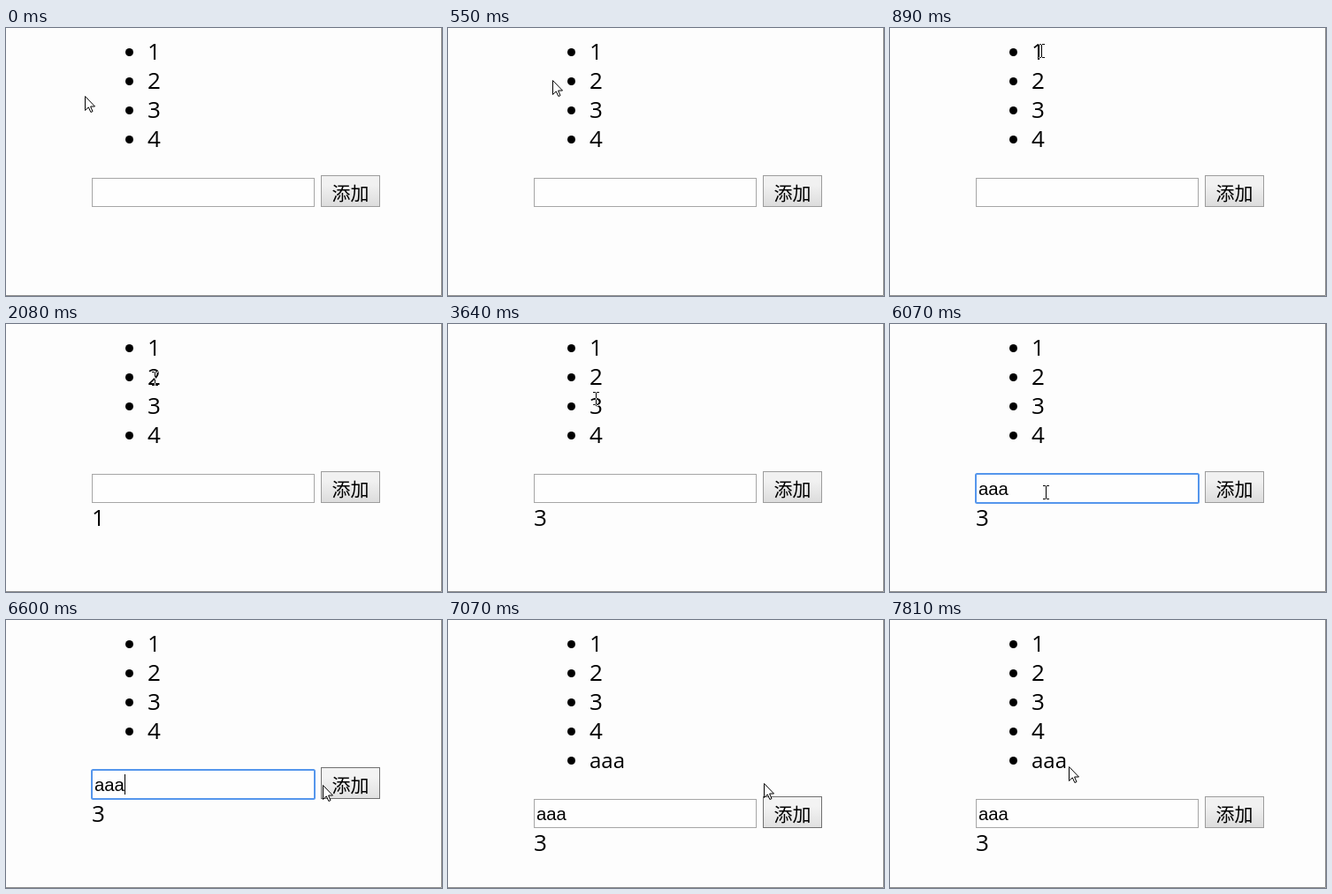
An HTML page that plays this animation: 493 by 304 pixels, repeating every 8000 ms.

```html
<!DOCTYPE html>
<html lang="zh">
<head>
<meta charset="utf-8">
<style>
html, body { margin: 0; width: 100%; height: 100%; overflow: hidden; background: #fdfdfd; }
svg { display: block; }
.list { font: 26px "Open Sans", sans-serif; }
.item { font-size: 24px; }
.field { font: 20.3px "Liberation Sans", sans-serif; }
.label { font: 21px "Noto Sans CJK SC", "Noto Sans CJK", sans-serif; text-anchor: middle; }
#beam { fill: #fff; mix-blend-mode: difference; }
</style>
</head>
<body>
<svg width="493" height="304" viewBox="0 0 493 304">
  <defs>
    <linearGradient id="normal" x2="0" y2="1">
      <stop offset=".3" stop-color="#f1f1f1"/><stop offset="1" stop-color="#dcdcdc"/>
    </linearGradient>
    <linearGradient id="hover" x2="0" y2="1">
      <stop offset=".3" stop-color="#f3f3f3"/><stop offset="1" stop-color="#e0e0e0"/>
    </linearGradient>
    <linearGradient id="pressed" x2="0" y2="1">
      <stop offset=".3" stop-color="#e7e7e7"/><stop offset="1" stop-color="#d7d7d7"/>
    </linearGradient>
  </defs>
  <rect width="493" height="304" fill="#fdfdfd"/>
  <path d="M492.5 0V303.5H0" fill="none" stroke="#8c8c8c"/>
  <g id="list" class="list"></g>
  <g id="form">
    <rect x="97.5" y="170.5" width="251" height="32" fill="#fefefe" stroke="#a6a6a6"/>
    <rect id="ring" x="97" y="170" width="252" height="33" rx="1.5" fill="none" stroke="#5596ec" stroke-width="2"/>
    <text id="typed" class="field" x="100" y="194"></text>
    <rect id="caret" y="175" width="1" height="23"/>
    <rect id="button" x="356.5" y="167.5" width="66" height="35"/>
    <text class="label" x="389.5" y="195">添加</text>
    <text id="picked" class="list" x="97" y="229"></text>
  </g>
  <path id="arrow" d="M.5 .5V16.5L4.3 12.9L6.9 18.5L9 17.6L6.6 12H11.5Z" fill="#fff" stroke="#000"/>
  <path id="beam" d="M-3-8h3v1h1v-1h3v1h-3v14h3v1h-3v-1h-1v1h-3v-1h3v-14h-3z"/>
</svg>
<script>
const LOOP = 8000, ROW = 33;
const FOCUS = 4500, PRESS = 6870, RELEASE = 7070;
const keys = [5230, 5390, 5510];
const picks = [1420, 2570, 3640];
// Pointer legs: start, end, x, y
const legs = [
  [320, 890, 171, 26],
  [1740, 2080, 168, 62],
  [2850, 3180, 167, 85],
  [3780, 4290, 173, 191],
  [6036, 6500, 360, 194],
  [6500, 6650, 357, 185],
  [7230, 7810, 202, 166]
];

const $ = id => document.getElementById(id);
const show = (id, on) => $(id).setAttribute('visibility', on ? 'visible' : 'hidden');
const move = (id, x, y) => $(id).setAttribute('transform', `translate(${x} ${y})`);
const inside = (x, y, l, t, r, b) => x >= l && x < r && y >= t && y < b;
const count = (times, t) => times.filter(k => t >= k).length;

$('list').innerHTML = ['1', '2', '3', '4', 'aaa'].map((s, i) =>
  `<g id="row${i}"><circle cx="139.5" cy="${27.5 + i * ROW}" r="4.5"/>` +
  `<text x="160" y="${36 + i * ROW}"${i > 3 ? ' class="item"' : ''}>${s}</text></g>`).join('');

function pointer(t) {
  let x = 89, y = 77;
  for (const [start, end, toX, toY] of legs) {
    if (t < start) break;
    const p = Math.min(1, (t - start) / (end - start));
    const e = p * p * (3 - 2 * p);
    x += (toX - x) * e;
    y += (toY - y) * e;
  }
  return [Math.round(x), Math.round(y)];
}

function draw(t) {
  const [x, y] = pointer(t);
  const added = t >= RELEASE;
  const focused = t >= FOCUS && t < PRESS;

  const typed = count(keys, t);
  const lastInput = typed ? keys[typed - 1] : FOCUS;
  $('typed').textContent = 'a'.repeat(typed);
  $('caret').setAttribute('x', Math.floor(100.2 + typed * 11.29));
  show('caret', focused && (t - lastInput) % 1080 < 540);
  show('ring', focused);

  $('picked').textContent = count(picks, t) || '';
  show('row4', added);
  move('form', 0, added ? ROW : 0);

  const over = t < RELEASE + 30 && inside(x, y, 356, 167, 423, 203);
  const state = !over ? 'normal' : t >= PRESS && !added ? 'pressed' : 'hover';
  $('button').setAttribute('fill', `url(#${state})`);
  $('button').setAttribute('stroke', over ? '#707070' : '#9c9c9c');

  const onText = inside(x, y, 160, 10, 174, 142) ||
    !added && inside(x, y, 97, 170, 349, 203);
  show('beam', onText);
  show('arrow', !onText);
  move('beam', x, y);
  move('arrow', x, y);
}

const begin = performance.now();
function tick() {
  draw((performance.now() - begin) % LOOP);
  requestAnimationFrame(tick);
}
tick();
</script>
</body>
</html>
```
